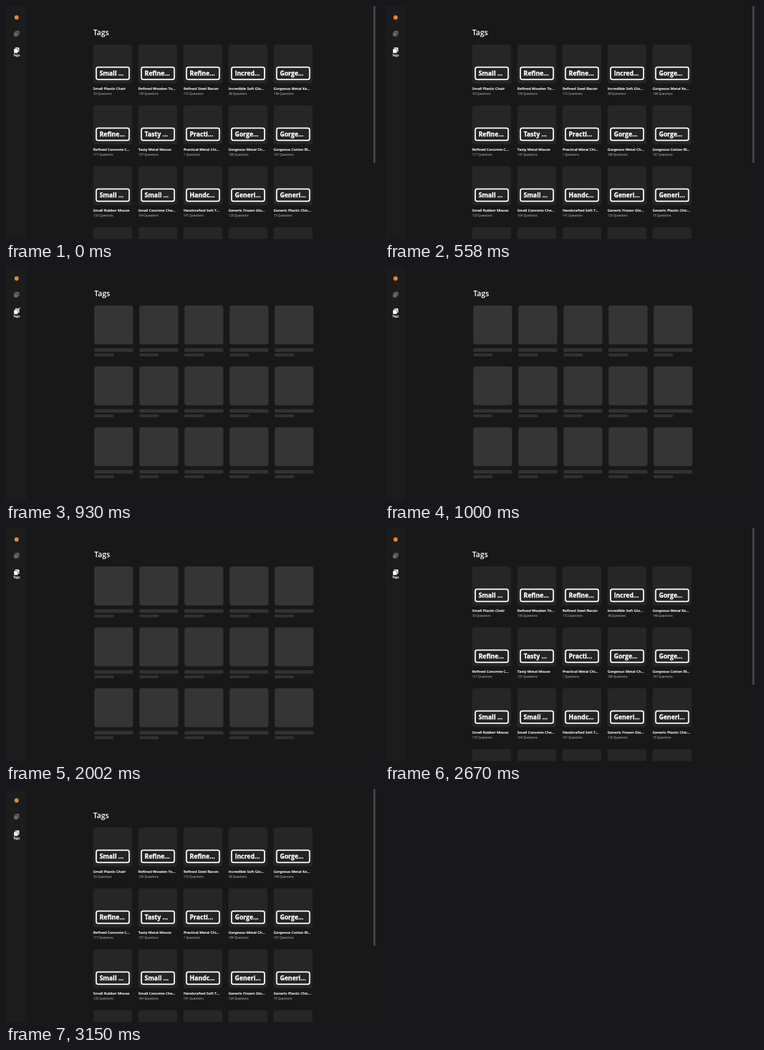
An HTML page that plays this animation: 600 by 375 pixels, repeating every 3.47 s.

```html
<!DOCTYPE html>
<html lang="en">
<head>
<meta charset="utf-8">
<title>Tags</title>
<style>
  html, body { margin: 0; width: 100%; height: 100%; overflow: hidden; background: #181818; }
  svg { display: block; width: 100vw; height: 100vh; font-family: "Open Sans", "Noto Sans", sans-serif; }
  text { fill: #fff; stroke: #fff; stroke-width: 0; }
  .loaded, .loading, .hint { animation: 3470ms step-end infinite; }
  .loaded { animation-name: loaded; }
  .loading { animation-name: loading; }
  .hint { animation-name: hint; fill: #a9cbd6; }
  @keyframes loaded {
    0%, 76.9452% { visibility: visible; }
    26.8012% { visibility: hidden; }
  }
  @keyframes loading {
    0%, 76.9452% { visibility: hidden; }
    26.8012% { visibility: visible; }
  }
  @keyframes hint {
    0%, 28.8184% { visibility: hidden; }
    26.8012% { visibility: visible; }
  }
  .heading { font-size: 12px; font-weight: 600; }
  .card { fill: #262626; }
  .badge { fill: #242424; stroke: #fff; stroke-width: 2; }
  .short { font-size: 10px; font-weight: 700; stroke-width: .3; }
  .name { font-size: 5.9px; font-weight: 600; stroke-width: .18; }
  .count { font-size: 4.8px; font-weight: 500; fill: #c8c8c8; }
  .block { fill: #353535; }
  .bar { fill: #323232; }
  .nav { font-size: 5.1px; font-weight: 600; text-anchor: middle; stroke-width: .15; }
</style>
</head>
<body>
<svg viewBox="0 0 600 375" preserveAspectRatio="none">
  <defs>
    <g id="stack">
      <rect x="2" y="0" width="6.8" height="7" rx="1.2"/>
      <rect x="0" y="2" width="6.9" height="7.2" rx="1.2" stroke="#1c1c1c" stroke-width=".7"/>
    </g>
  </defs>
  <rect width="600" height="375" fill="#181818"/>
  <rect width="33.5" height="375" fill="#1c1c1c"/>
  <circle cx="17" cy="18.5" r="3.4" fill="#e8862e"/>
  <use href="#stack" x="12.5" y="40" fill="#686868"/>
  <use href="#stack" x="12.5" y="66.8" fill="#fff"/>
  <circle class="hint" cx="22.3" cy="66" r=".9"/>
  <text class="nav" x="17" y="81.2">Tags</text>

  <g class="loaded" id="loaded">
    <text class="heading" x="140.2" y="47.4">Tags</text>
    <rect x="591" y="0" width="3.2" height="252.5" rx="1" fill="#464646"/>
  </g>
  <g class="loading" id="loading">
    <text class="heading" x="142" y="47.4">Tags</text>
  </g>
</svg>
<script>
  const tags = [
    ["Small …", "Small Plastic Chair", 33],
    ["Refine…", "Refined Wooden To…", 139],
    ["Refine…", "Refined Steel Bacon", 172],
    ["Incred…", "Incredible Soft Glo…", 38],
    ["Gorge…", "Gorgeous Metal Ke…", 148],
    ["Refine…", "Refined Concrete C…", 117],
    ["Tasty …", "Tasty Metal Mouse", 137],
    ["Practi…", "Practical Metal Chi…", 1],
    ["Gorge…", "Gorgeous Metal Ch…", 189],
    ["Gorge…", "Gorgeous Cotton Bi…", 107],
    ["Small …", "Small Rubber Mouse", 133],
    ["Small …", "Small Concrete Che…", 164],
    ["Handc…", "Handcrafted Soft T…", 141],
    ["Generi…", "Generic Frozen Glo…", 125],
    ["Generi…", "Generic Plastic Chic…", 73]
  ];
  const COLS = 5, STEP_X = 72.55, STEP_Y = 98, TOP = 62, SIZE = 62.5;

  const rect = (cls, x, y, w, h, r) =>
    `<rect class="${cls}" x="${x}" y="${y}" width="${w}" height="${h}" rx="${r}"/>`;
  const text = (cls, x, y, s) => `<text class="${cls}" x="${x}" y="${y}">${s}</text>`;

  function grid(id, left, count, draw) {
    let out = "";
    for (let i = 0; i < count; i++) {
      const x = left + (i % COLS) * STEP_X;
      const y = TOP + Math.floor(i / COLS) * STEP_Y;
      out += `<g transform="translate(${x} ${y})">${draw(tags[i])}</g>`;
    }
    document.getElementById(id).insertAdjacentHTML("beforeend", out);
  }

  grid("loaded", 140.3, 20, tag => {
    const card = rect("card", 0, 0, SIZE, SIZE, 4);
    if (!tag) return card;
    const [short, name, n] = tag;
    return card + rect("badge", 4.9, 36.4, 53, 19.8, 3) +
      text("short", 10.2, 49.9, short) +
      text("name", 0, 73.3, name) +
      text("count", 0.2, 81.3, n + " Questions");
  });

  grid("loading", 142, 15, () =>
    rect("block", 0, 0, SIZE, SIZE, 4) +
    rect("bar", 0, 68.8, SIZE, 5.6, 1.5) +
    rect("bar", 0, 77.3, SIZE / 2, 4.5, 1.5));
</script>
</body>
</html>
```
